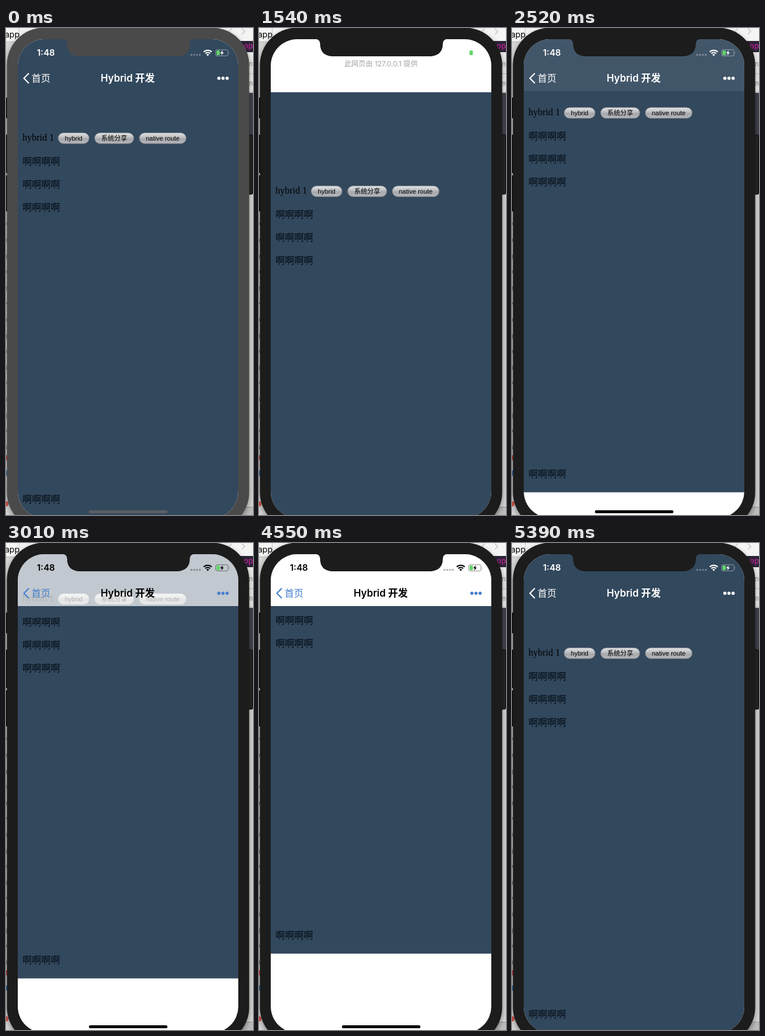
Write an HTML page that moves like this. It is 420x826 px and loops after 5.46 s.

```html
<!DOCTYPE html>
<html lang="zh">
<head>
<meta charset="utf-8">
<style>
html, body { margin: 0; height: 100%; overflow: hidden; background: #d6d6d6; }
svg { display: block; width: 100%; height: 100%; }
text { white-space: pre; }
.ui { font-family: Inter, "Noto Sans CJK SC", "Noto Sans CJK", sans-serif; }
.serif { font: 16px "Liberation Serif", "Noto Serif", serif; }
.cjk { font: 16px "Noto Sans CJK SC", "Noto Sans CJK", sans-serif; }
.btn { font: 11px "Liberation Sans", "Noto Sans CJK SC", "Noto Sans CJK", sans-serif; text-anchor: middle; }
#bezel { filter: drop-shadow(0 4px 5px rgba(0,0,0,.4)); }
</style>
</head>
<body>
<svg viewBox="0 0 420 826">
  <defs>
    <clipPath id="screen"><rect x="20" y="19" width="375" height="812" rx="45"/></clipPath>
    <linearGradient id="metal" x2="0" y2="1">
      <stop stop-color="#e4e4e6"/><stop offset=".45" stop-color="#b9bbbe"/>
      <stop offset=".55" stop-color="#a6a8ac"/><stop offset="1" stop-color="#b4b6ba"/>
    </linearGradient>
  </defs>

  <!-- desktop behind the phone -->
  <rect width="420" height="826" fill="#d6d6d6"/>
  <rect width="420" height="22" fill="#f4f4f4"/>
  <path d="M0 24.5H24M22.5 0V24" stroke="#c4c4c4"/>
  <path d="M384 1l-5 5 5 5M401 1l5 5-5 5" fill="none" stroke="#c6c6c6" stroke-width="1.5"/>
  <rect x="380" y="22" width="40" height="19" fill="#2b2436"/>
  <rect x="395" y="41" width="25" height="69" fill="#ececec"/>
  <path d="M400 77.5H420M400 108.5H420" stroke="#bdbdbd"/>
  <rect x="400" y="110" width="20" height="75" fill="#40424e"/>
  <g class="ui">
    <text x="-2" y="16" font-size="14">app</text>
    <text x="404" y="35" font-size="13" font-weight="600" fill="#b0268f">op</text>
    <text x="413" y="65" font-size="11" fill="#888">nt</text>
    <text x="410" y="98" font-size="11" fill="#888">mo</text>
  </g>
  <path d="M400 812.5H420" stroke="#999"/>
  <rect x="400" y="813" width="20" height="13" fill="#bcbcbc"/>
  <g id="ticks"></g>

  <!-- phone -->
  <path d="M0 118h3v35H0zM0 181h3v65H0zM0 250h3v61H0z" fill="#111"/>
  <rect x="408" y="181" width="11.5" height="101" rx="2" fill="#262626" stroke="#080808"/>
  <rect id="bezel" x="1.5" y="-.5" width="412" height="851" rx="63"/>
  <g clip-path="url(#screen)">
    <rect x="20" y="19" width="375" height="812" fill="#fff"/>
    <text class="ui" x="207.5" y="64.5" font-size="12" text-anchor="middle" fill="#a2a2a2">此网页由 127.0.0.1 提供</text>
    <g id="page">
      <rect x="20" y="19" width="375" height="811.5" fill="#32485d"/>
      <text class="serif" x="28" y="191">hybrid 1</text>
    </g>
    <rect id="bar" x="20" y="19" width="375" height="88" fill="#fff"/>
    <g id="label" class="ui" fill="currentColor">
      <text x="52.5" y="47.3" font-size="15" font-weight="600">1:48</text>
      <text x="207" y="91" font-size="16.7" font-weight="600" text-anchor="middle">Hybrid 开发</text>
      <g opacity=".3">
        <circle cx="315.2" cy="45.5" r="1.7"/><circle cx="320" cy="45.5" r="1.7"/>
        <circle cx="324.8" cy="45.5" r="1.7"/><circle cx="329.6" cy="45.5" r="1.7"/>
      </g>
      <path d="M336.2 40.5A9.6 9.6 0 0 1 349.8 40.5M338.9 43.2A5.8 5.8 0 0 1 347.1 43.2" fill="none" stroke="currentColor" stroke-width="2.1"/>
      <path d="M343 47.6l-2.3-2.4a3.2 3.2 0 0 1 4.6 0z"/>
      <rect x="356.5" y="36.8" width="21" height="10.6" rx="2.6" fill="none" stroke="currentColor" opacity=".45"/>
      <path d="M379 40.3q1.8 1.8 0 3.6z" opacity=".45"/>
      <rect x="358" y="38.3" width="5.6" height="7.6" rx="1" fill="#62d668"/>
      <path d="M368.8 37.6l-4.8 5.2h3l-1.2 4 4.8-5.2h-3z"/>
    </g>
    <g id="tint" class="ui" fill="currentColor">
      <path d="M38.8 76.8l-8.3 8.5 8.3 8.5" fill="none" stroke="currentColor" stroke-width="2.1"/>
      <text x="43.5" y="91" font-size="16">首页</text>
      <circle cx="362" cy="85.3" r="2.7"/><circle cx="369" cy="85.3" r="2.7"/><circle cx="376" cy="85.3" r="2.7"/>
    </g>
    <rect id="home" x="141" y="818" width="133.5" height="5" rx="2.5"/>
  </g>
  <path id="notch" d="M95 18.5Q104 19 104 27C104 40 111 48 127 48H289C305 48 312.5 40 312.5 27Q312.5 19 321 18.5z"/>
</svg>
<script>
const LOOP = 5460, STEP = 70;
const $ = id => document.getElementById(id);

// page content
const add = html => $('page').insertAdjacentHTML('beforeend', html);
for (const [x, w, name] of [[88, 54, 'hybrid'], [150, 68, '系统分享'], [226, 81, 'native route']])
  add(`<rect x="${x + .5}" y="177.7" width="${w - 1}" height="18.6" rx="9.3" fill="url(#metal)" stroke="#5c646d"/>
    <text class="btn" x="${x + w / 2}" y="191">${name}</text>`);
for (const y of [232, 271, 310, 805])
  add(`<text class="cjk" x="28" y="${y}" fill="#020a12">啊啊啊啊</text>`);

// slivers of text and icons peeking out at the left edge
let ticks = '';
for (let y = 330; y < 720; y += 27)
  ticks += `<rect y="${y}" width="1.5" height="${4 + y % 5}" fill="#888"/>`;
for (const [y, c] of [[729, '#d8504e'], [755, '#3f7fc4'], [807, '#d8584e']])
  ticks += `<circle cx="0" cy="${y}" r="4.5" fill="${c}"/>`;
$('ticks').innerHTML = ticks;

// finger drags as [ms, offset]; each release springs back to rest
const pull = [[210, 0], [420, 9], [770, 34], [1540, 90], [1640, 92]];
const push = [[2220, 0], [2520, -43], [3010, -92], [3500, -117], [3920, -129], [4340, -134], [4550, -134]];

function along(points, t) {
  if (t <= points[0][0]) return points[0][1];
  for (let i = 1; i < points.length; i++) {
    const [t0, a] = points[i - 1], [t1, b] = points[i];
    if (t <= t1) return a + (b - a) * (t - t0) / (t1 - t0);
  }
}
function spring(points, t) {
  const [start, from] = points[points.length - 1];
  const k = (t - start) * .011;
  return from * (1 + k) * Math.exp(-k);
}
function offset(t) {
  if (t <= 1640) return along(pull, t);
  if (t < 2220) return spring(pull, t);
  return t <= 4550 ? along(push, t) : spring(push, t);
}

function draw(now) {
  const t = Math.floor(now % LOOP / STEP) * STEP;
  const y = Math.round(offset(t));
  const alpha = Math.min(1, Math.max(0, (-y - 36.7) / 79));
  const light = alpha > .5;
  const idle = t < 210;
  $('page').setAttribute('transform', `translate(0 ${y})`);
  $('bar').setAttribute('opacity', alpha);
  $('label').style.color = light ? '#000' : '#fff';
  $('tint').style.color = light ? '#457fcb' : '#fff';
  const shell = idle ? '#4a4a4a' : '#1c1c1c';
  $('bezel').setAttribute('fill', shell);
  $('notch').setAttribute('fill', shell);
  $('home').setAttribute('fill', y < -10 ? '#000' : '#5b5f63');
  $('home').setAttribute('opacity', y < -10 || idle ? 1 : 0);
}
function frame() {
  draw(performance.now());
  requestAnimationFrame(frame);
}
frame();
</script>
</body>
</html>
```
